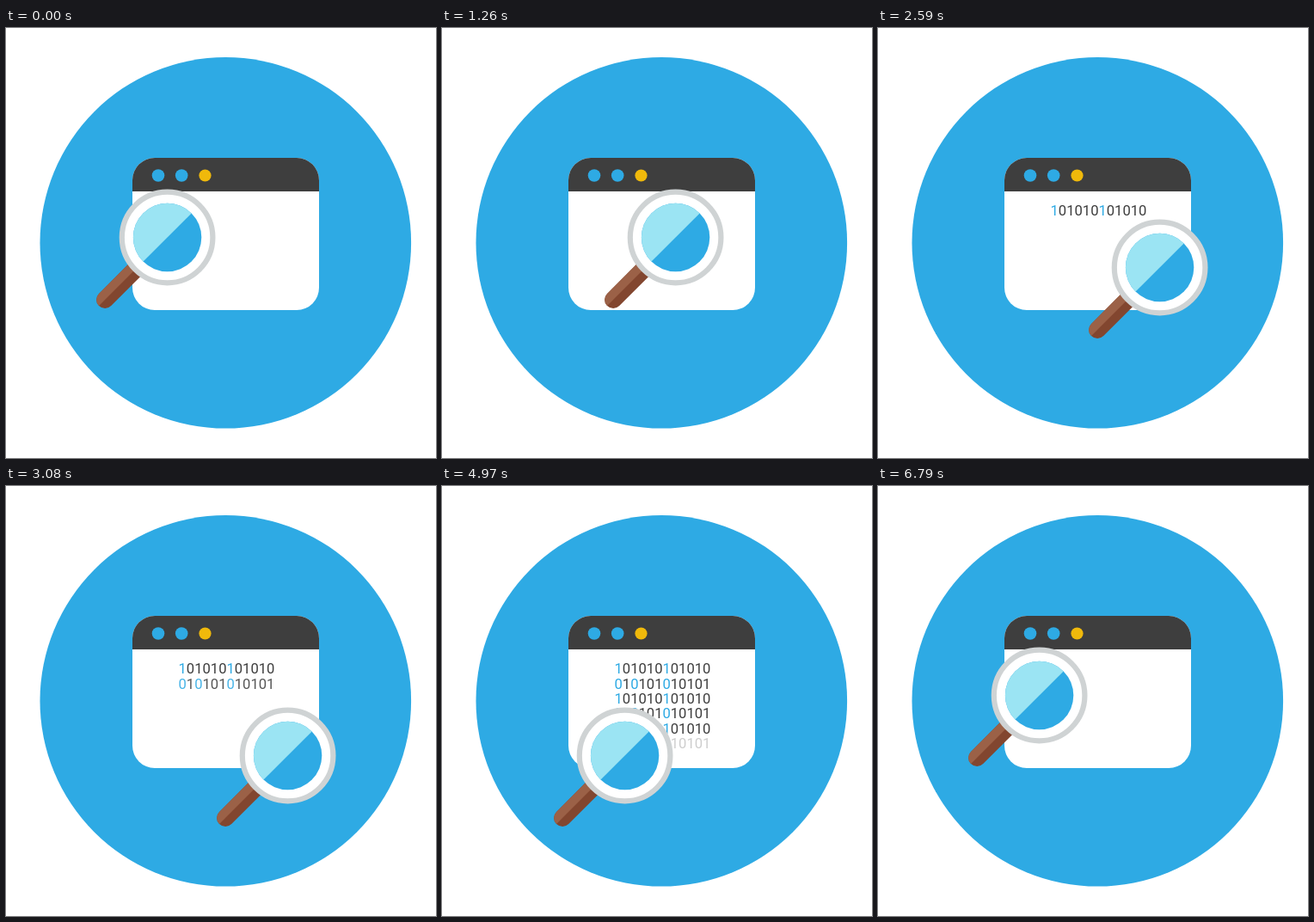
Write an HTML page without scripts that moves like this. It is 500 px wide and 500 px high and loops after 6860 ms.

```html
<!DOCTYPE html>
<html lang="en">
<head>
<meta charset="utf-8">
<title>Search window</title>
<style>
  /* One tick is 70 ms; every pose is computed from the tick count. */
  @property --t {
    syntax: "<number>";
    inherits: true;
    initial-value: 0;
  }
  @keyframes tick { to { --t: 98; } }

  html, body { margin: 0; height: 100%; overflow: hidden; background: #fff; }
  svg {
    display: block;
    width: 100%;
    height: 100%;
    animation: tick 6860ms steps(98) -3ms infinite;
  }

  .glass {
    --right: clamp(0, (var(--t) - 3) / 25, 1);
    --down: clamp(0, (var(--t) - 30) / 14, 1);
    --left: clamp(0, (var(--t) - 48) / 28, 1);
    --up: clamp(0, (var(--t) - 82) / 13, 1);
    transform: translate(
      calc(187.6px + 140px * (var(--right) - var(--left))),
      calc(243.5px + 70px * (var(--down) - var(--up))));
  }

  /* Rows appear one after another and leave together. */
  text {
    font: 16.6px Roboto, sans-serif;
    fill: #3e3e3e;
    opacity: clamp(0, min((var(--t) - 29) / 8 - var(--row), (95 - var(--t)) / 3), 1);
    transform: translateY(calc(17.35px * var(--row)));
  }
  .blue, tspan { fill: #2eaae4; }
  .dark { fill: #3e3e3e; }
</style>
</head>
<body>
<svg viewBox="0 0 500 500">
  <circle class="blue" cx="255.3" cy="249.8" r="215.8"/>

  <rect x="147" y="151" width="217" height="177" rx="26" fill="#fff"/>
  <path class="dark" d="M147 190V177A26 26 0 0 1 173 151H338A26 26 0 0 1 364 177V190Z"/>
  <circle class="blue" cx="177" cy="171.5" r="7.3"/>
  <circle class="blue" cx="204.2" cy="171.5" r="7.3"/>
  <circle cx="231.5" cy="171.5" r="7.1" fill="#f0b90b"/>

  <g>
    <text x="200.5" y="218.2" style="--row:0"><tspan>1</tspan>01010<tspan>1</tspan>01010</text>
    <text x="200.5" y="218.2" style="--row:1"><tspan>0</tspan>1<tspan>0</tspan>101<tspan>0</tspan>10101</text>
    <text x="200.5" y="218.2" style="--row:2"><tspan>1</tspan>01010<tspan>1</tspan>01010</text>
    <text x="200.5" y="218.2" style="--row:3"><tspan>0</tspan>1<tspan>0</tspan>101<tspan>0</tspan>10101</text>
    <text x="200.5" y="218.2" style="--row:4"><tspan>1</tspan>01010<tspan>1</tspan>01010</text>
    <text x="200.5" y="218.2" style="--row:5"><tspan>0</tspan>1<tspan>0</tspan>101<tspan>0</tspan>10101</text>
  </g>

  <g class="glass">
    <g transform="rotate(45)">
      <path d="M-10 50V102.5A10 10 0 0 0 10 102.5V50Z" fill="#82462f"/>
      <path d="M-10 50V102.5A10 10 0 0 0 0 112.5V50Z" fill="#9b6147"/>
      <circle r="52.8" fill="#fff" stroke="#cfd3d4" stroke-width="6.2"/>
      <circle class="blue" r="39.7"/>
      <path d="M0-39.7A39.7 39.7 0 0 0 0 39.7Z" fill="#9be4f3"/>
    </g>
  </g>
</svg>
</body>
</html>
```
